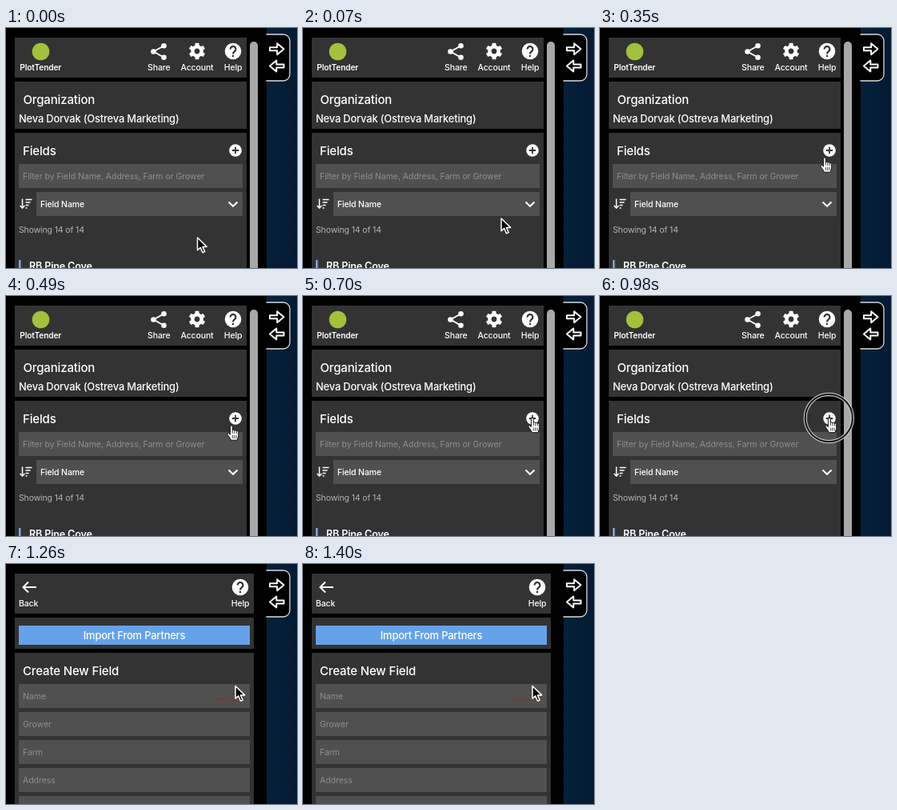
An HTML page for the animation above (1.47 s loop, 364 by 300 pixels).

```html
<!DOCTYPE html>
<html lang="en">
<head>
<meta charset="utf-8">
<title>Create a field</title>
<style>
  html, body { margin: 0; width: 100%; height: 100%; overflow: hidden; background: #000; }
  svg { display: block; width: 364px; height: 300px; }
  text { font: 500 10.5px Inter, Roboto, sans-serif; letter-spacing: -.013em; fill: #fff; }
  .title { font-size: 15px; letter-spacing: -.01em; }
  .body { font-size: 12.9px; }
  .name { font-size: 12.6px; font-weight: 600; }
  .hint { font-weight: 400; letter-spacing: -.004em; fill: #8e8e8e; }
  .count { font-weight: 400; fill: #b4b4b4; }
  .mid { text-anchor: middle; }
  .brand { font-size: 10.2px; font-weight: 600; }
  .tiny { font-size: 7px; fill: #733c35; }
  .panel { fill: #333; }
  .input { fill: #505050; }
  .line { fill: none; stroke: #fff; stroke-width: 2; }
</style>
</head>
<body>
<svg viewBox="0 0 364 300">
  <defs>
    <linearGradient id="sea" x1="0" y1="0" x2="1" y2="0">
      <stop offset="0" stop-color="#05203b"/>
      <stop offset="1" stop-color="#041a32"/>
    </linearGradient>
    <g id="help">
      <circle r="10.3" fill="#fff"/>
      <path d="M-3.4-2.6a3.4 3.4 0 1 1 5.7 2.5C.8 1.1 0 1.7 0 3.4" fill="none" stroke="#333" stroke-width="2.2"/>
      <rect x="-1.1" y="4.9" width="2.2" height="2.2" fill="#333"/>
    </g>
  </defs>

  <rect width="364" height="300"/>
  <rect x="326" width="38" height="300" fill="url(#sea)"/>
  <path d="M325.5 8H347a8 8 0 0 1 8 8V58a8 8 0 0 1-8 8H325.5" fill="#000" stroke="#d8dbde" stroke-width="1.3"/>
  <g fill="none" stroke="#fff" stroke-width="2" stroke-linejoin="round">
    <path d="M330 24.2h9.200v-5l8.300 7-8.300 7v-5H330z"/>
    <path d="M347.500 45.400h-9.200v-5l-8.300 7 8.300 7v-5h9.200z"/>
  </g>

  <g id="list">
    <rect class="panel" x="11" y="12" width="290" height="50"/>
    <rect class="panel" x="11" y="67" width="290" height="59"/>
    <rect class="panel" x="11" y="131" width="290" height="170"/>
    <rect x="305" y="17" width="10" height="300" rx="5" fill="#a8a8a8"/>

    <circle cx="43.5" cy="29.5" r="10.8" fill="#a2c13c"/>
    <text class="mid brand" x="43.3" y="52.5">PlotTender</text>

    <path class="line" d="M198 22L184.5 29.5L198 37"/>
    <g fill="#fff">
      <circle cx="197.5" cy="22.2" r="3.3"/>
      <circle cx="184.5" cy="29.5" r="3.3"/>
      <circle cx="197.5" cy="36.8" r="3.3"/>
    </g>
    <text class="mid" x="191.3" y="53">Share</text>
    <g id="gear" transform="translate(239 29)">
      <circle r="5.6" fill="none" stroke="#fff" stroke-width="4.4"/>
    </g>
    <text class="mid" x="239" y="53">Account</text>
    <use href="#help" x="284" y="29"/>
    <text class="mid" x="284" y="53">Help</text>

    <text class="title" x="21.5" y="95">Organization</text>
    <text class="body" x="16" y="118">Neva Dorvak (Ostreva Marketing)</text>

    <text class="title" x="21" y="159">Fields</text>
    <circle cx="287" cy="153" r="7.8" fill="#fff"/>
    <path d="M282.8 153h8.4M287 148.8v8.4" stroke="#333" stroke-width="1.8"/>
    <rect class="input" x="16" y="170" width="280" height="30"/>
    <text class="hint" x="21" y="189">Filter by Field Name, Address, Farm or Grower</text>
    <path class="line" style="stroke-width:1.5" d="M20.5 213.5V225M17.6 222l2.9 3.2 2.9-3.2M24.5 214.5h8M24.5 218h6M24.5 221.5h4M24.5 225h2"/>
    <rect class="input" x="38" y="205" width="258" height="30"/>
    <text x="43" y="224">Field Name</text>
    <path class="line" d="M278.5 217.5l5.5 5.3 5.5-5.3"/>
    <text class="count" x="16" y="256">Showing 14 of 14</text>
    <rect x="16" y="290" width="2.5" height="10" fill="#7da6e4"/>
    <text class="name" x="29" y="301.5">RB Pine Cove</text>
  </g>

  <g id="form">
    <rect class="panel" x="11" y="12" width="299" height="50"/>
    <rect class="panel" x="11" y="67" width="299" height="39"/>
    <rect class="panel" x="11" y="111" width="299" height="190"/>
    <path class="line" d="M38 29H22M28 22.5L21.5 29l6.5 6.5"/>
    <text x="16" y="53">Back</text>
    <use href="#help" x="293" y="29"/>
    <text class="mid" x="293" y="53">Help</text>
    <rect x="16" y="77" width="289" height="24" fill="#66a2e9"/>
    <text class="mid body" x="160.5" y="94">Import From Partners</text>
    <text class="title" x="21" y="139">Create New Field</text>
    <g id="inputs"></g>
    <text class="tiny" x="259" y="171">saved names</text>
  </g>

  <g id="ring" fill="none">
    <circle stroke="#d4d4d4" stroke-width="4.2"/>
    <circle stroke="#1c1c1c" stroke-width="2.2"/>
  </g>
  <g id="cursor">
    <path id="arrow" d="M0 0V15.8l3.7-3.4 2.7 6.3 2.7-1.1-2.7-6.2h5.2z" fill="#000" stroke="#fff" stroke-width="1.5" stroke-linejoin="round"/>
    <g id="hand" stroke="#111" stroke-linejoin="round">
      <path d="M-1.6 1.3C-1.6-.5 1.2-.5 1.3 1.3V6c.3-1.2 2.5-1 2.6.5.5-1.1 2.4-.8 2.5.7.6-.9 2.3-.5 2.3 1v4c0 2.8-1.5 3.3-1.5 6H-.8c-.2-2.6-2.5-4.2-4.1-7.100-.8-1.6.9-2.5 2-1.3l1.300 1.5z" fill="#fff"/>
      <path d="M1.300 6v3.500M3.900 6.500V10M6.400 7.200V10M1.300 12v4M3.600 12v4M5.900 12v4" stroke-width=".8"/>
    </g>
  </g>
</svg>
<script>
const STEP = 70, LOOP = 1470;
const HAND_AT = 5, FORM_AT = 18, RING_FROM = 10, RING_TO = 17;
const CENTER = [286.3, 152.5];

// Pointer path: step, x, y
const PATH = [
  [0, 239.5, 262], [1, 248, 238], [2, 264, 195], [3, 276, 161.5],
  [5, 281, 162], [7, 282, 162], [8, 283, 160], [10, 287, 152.5]
];

const $ = id => document.getElementById(id);
const show = (id, on) => $(id).setAttribute('display', on ? 'inline' : 'none');

function add(parent, tag, attrs, text = '') {
  const el = document.createElementNS('http://www.w3.org/2000/svg', tag);
  for (const key in attrs) el.setAttribute(key, attrs[key]);
  el.textContent = text;
  parent.append(el);
}

['Name', 'Grower', 'Farm', 'Address', ''].forEach((label, i) => {
  const y = 150 + i * 35;
  add($('inputs'), 'rect', { class: 'input', x: 16, y, width: 289, height: 30 });
  add($('inputs'), 'text', { class: 'hint', x: 21, y: y + 19 }, label);
});

for (let a = 0; a < 360; a += 60) {
  add($('gear'), 'rect', { x: -2.5, y: -10.2, width: 5, height: 4, rx: .8, fill: '#fff', transform: `rotate(${a})` });
}

function pointAt(step) {
  const next = PATH.findIndex(p => p[0] > step);
  if (next < 0) return PATH.at(-1).slice(1);
  const [s0, x0, y0] = PATH[next - 1], [s1, x1, y1] = PATH[next];
  const k = (step - s0) / (s1 - s0);
  return [x0 + (x1 - x0) * k, y0 + (y1 - y0) * k];
}

function draw(step) {
  const form = step >= FORM_AT;
  const hand = step >= HAND_AT && !form;
  show('list', !form);
  show('form', form);
  show('hand', hand);
  show('arrow', !hand);
  $('cursor').setAttribute('transform', `translate(${pointAt(step)})`);

  const ringOn = step > RING_FROM && step < RING_TO;
  show('ring', ringOn);
  if (ringOn) {
    const r = Math.min(30, (step - RING_FROM) * 7.4);
    for (const c of $('ring').children) c.setAttribute('r', r);
    $('ring').setAttribute('transform', `translate(${CENTER})`);
    $('ring').setAttribute('opacity', Math.min(1, (RING_TO - step) / 3));
  }
}

const start = performance.now();
function tick() {
  draw(Math.floor((performance.now() - start) % LOOP / STEP));
  requestAnimationFrame(tick);
}
tick();
</script>
</body>
</html>
```
